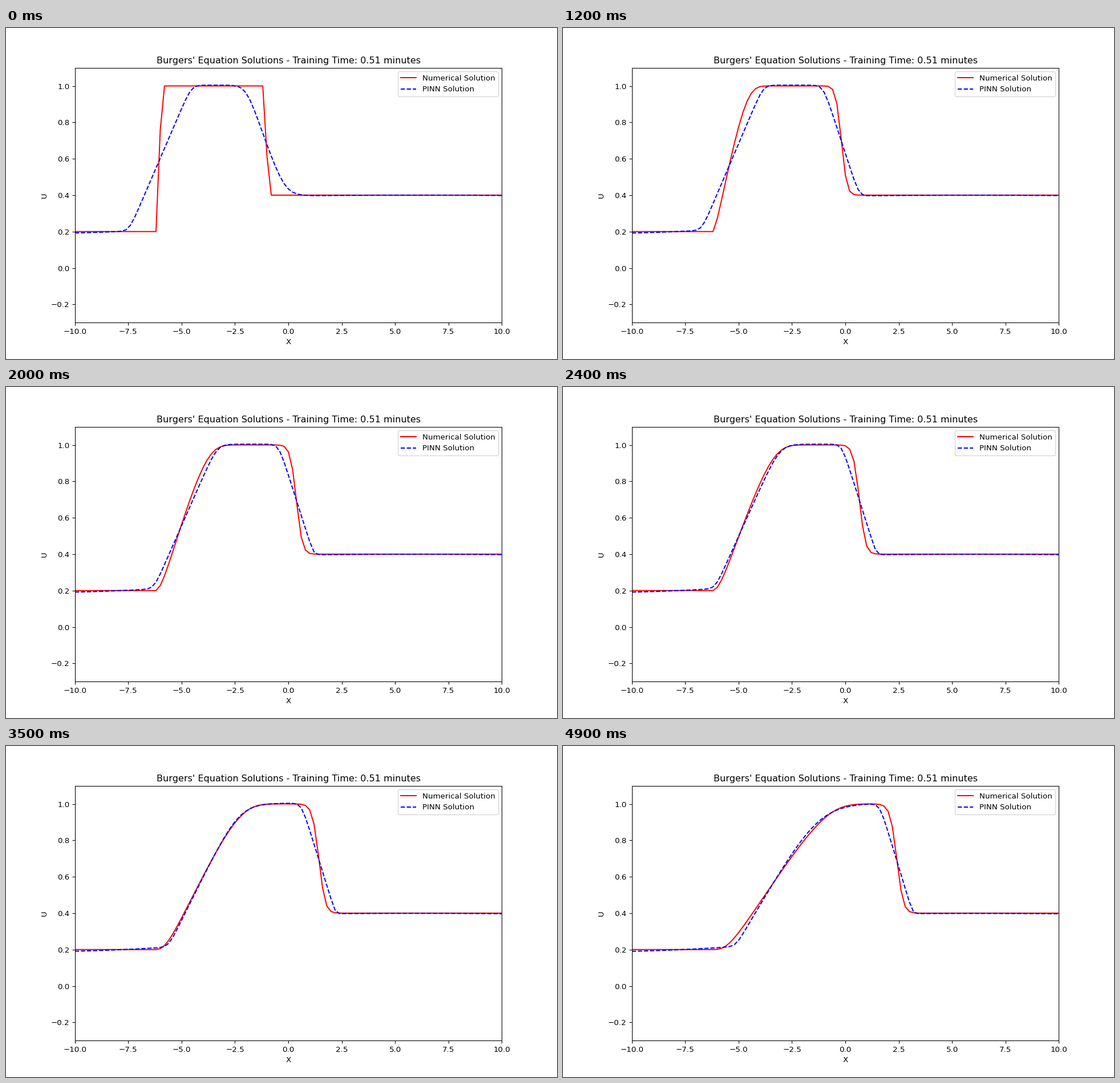
These frames come from a looping animation (966 by 580 pixels, 5000 ms). A matplotlib script:

```python
import numpy as np
import matplotlib.pyplot as plt
from matplotlib.animation import FuncAnimation

FRAMES, INTERVAL = 50, 100
DT, DX = 0.1, 0.2
TOP = 1.004
x = np.linspace(-10, 10, 101)


def numerical_solution():
    """Conservative upwind scheme, one time step per frame."""
    u = np.full(x.size, 0.4)
    u[:20] = 0.2
    u[20:45] = 1.0
    history = []
    for _ in range(FRAMES):
        flux = u**2 / 2
        u = u.copy()
        u[1:] -= DT / DX * np.diff(flux)
        history.append(u)
    return history


def bend(corner, width):
    """Zero left of the corner, slope one right of it, rounded between."""
    return width * np.logaddexp(0, (x - corner) / width)


def left_level(p, t):
    q = p + 8
    return 0.2 + 0.005 * q + 0.0006 * q**2 - 0.0004 * t


def right_level(p, t):
    return 0.4 - 0.00012 * (p - 6)**2 - 0.0003 * t


def pinn_solution(t):
    """A rising and a falling ramp whose rounded corners drift with time."""
    settle = np.exp(-t / 0.8)
    foot = -7.47 + 0.66 * t - 0.038 * t**2
    shoulder = -4.53 + 0.55 * t + 0.026 * t**2
    crest = -1.86 + 0.705 * t - 0.13 * settle
    toe = -0.17 + 0.68 * t

    rise = (TOP - left_level(foot, t)) / (shoulder - foot)
    fall = (TOP - right_level(toe, t)) / (toe - crest)
    shoulder_width = 0.12 + 0.18 * max(0, t - 1.7)
    up = rise * (bend(foot, 0.11) - bend(shoulder, shoulder_width))
    down = fall * (bend(crest, 0.1 + 0.08 * settle)
                   - bend(toe, 0.05 + 0.22 * settle))
    tail = right_level(np.maximum(x, toe), t) - right_level(toe, t)
    return left_level(np.minimum(x, foot), t) + up - down + tail


numerical = numerical_solution()

plt.rcParams["font.family"] = "DejaVu Sans"
fig, ax = plt.subplots(figsize=(966 / 96, 580 / 96), dpi=96)
red_line, = ax.plot(x, numerical[0], "r-", label="Numerical Solution")
blue_line, = ax.plot(x, pinn_solution(0), "b--", label="PINN Solution")
ax.set(xlim=(-10, 10), ylim=(-0.3, 1.1), xlabel="X", ylabel="U",
       title="Burgers' Equation Solutions - Training Time: 0.51 minutes")
ax.legend(loc="upper right")


def update(frame):
    red_line.set_ydata(numerical[frame])
    blue_line.set_ydata(pinn_solution(frame * DT))
    return red_line, blue_line


anim = FuncAnimation(fig, update, frames=FRAMES, interval=INTERVAL, repeat=True)
plt.show()
```
